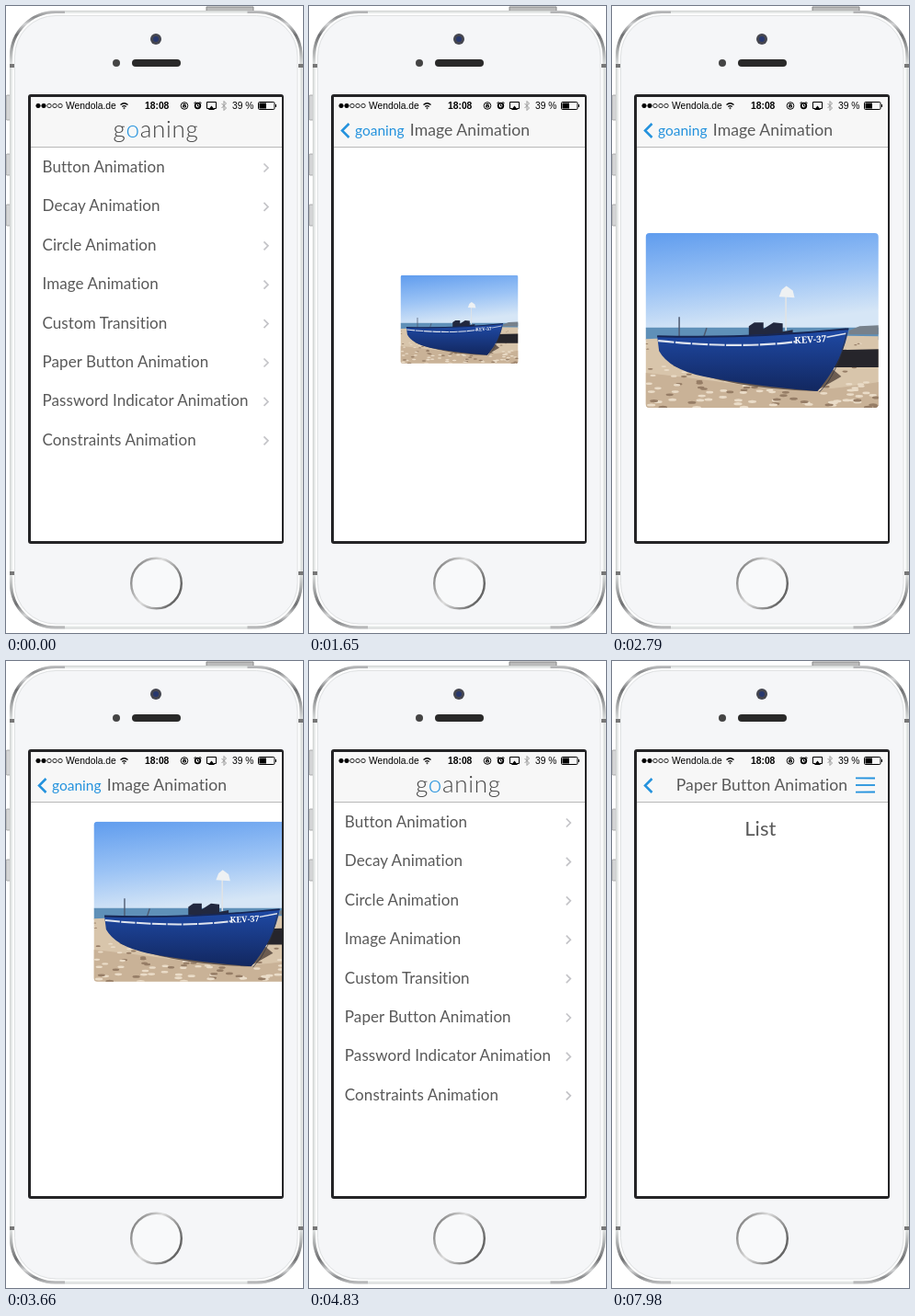
Write an HTML page that moves like this. It is 323 px wide and 682 px high and loops after 8000 ms.

```html
<!DOCTYPE html>
<html lang="en">
<head>
<meta charset="utf-8">
<title>Phone demo</title>
<style>
  html, body { margin: 0; width: 100%; height: 100%; overflow: hidden; background: #fff; }
  svg { display: block; width: 323px; height: 682px; }
  text { font-family: Lato, sans-serif; fill: #595959; font-variant-ligatures: none; }
  .status text { font: 10.3px "Liberation Sans", Arial, sans-serif; fill: #000; }
  .status .clock { font-weight: bold; }
  .row { font-size: 17px; letter-spacing: .08px; }
  .title { font-size: 17.6px; text-anchor: middle; letter-spacing: .05px; }
  .big { font-size: 22px; text-anchor: middle; }
  .line { fill: none; stroke: #2492dd; }
</style>
</head>
<body>
<svg viewBox="0 0 323 682">
  <defs>
    <linearGradient id="corner" gradientUnits="userSpaceOnUse" x1="0" y1="5" x2="0" y2="64">
      <stop offset="0" stop-color="#c4c5c6"/>
      <stop offset=".12" stop-color="#8a8b8d"/>
      <stop offset=".25" stop-color="#d2d3d4"/>
      <stop offset=".45" stop-color="#6f7072"/>
      <stop offset="1" stop-color="#dfe2e1"/>
    </linearGradient>
    <linearGradient id="ring" x2="1" y2=".5">
      <stop offset="0" stop-color="#666"/>
      <stop offset=".5" stop-color="#dedede"/>
      <stop offset="1" stop-color="#666"/>
    </linearGradient>
    <linearGradient id="sky" x2=".25" y2="1">
      <stop offset="0" stop-color="#5f9cee"/>
      <stop offset=".55" stop-color="#9bc3f5"/>
      <stop offset="1" stop-color="#d6e6f6"/>
    </linearGradient>
    <linearGradient id="hull" x2="0" y2="1">
      <stop offset="0" stop-color="#1f4aa6"/>
      <stop offset="1" stop-color="#12275f"/>
    </linearGradient>
    <clipPath id="screen"><path d="M27 99H300V582H27Z"/></clipPath>
    <clipPath id="photoEdge"><rect x="36.5" y="245.3" width="254" height="190.700" rx="4"/></clipPath>
    <path id="cornerArc" d="M5.500 63V55A48.500 48.500 0 0 1 54 6.500H64" fill="none" stroke="url(#corner)" stroke-width="3.200"/>
  </defs>

  <!-- phone body -->
  <path d="M218 5V1H269V5" fill="#bbb" stroke="#888"/>
  <g fill="#d4d5d6" stroke="#999" stroke-width=".8">
    <rect x="0" y="97" width="5" height="27" rx="1.5"/>
    <rect x="0" y="161" width="5" height="23" rx="1.5"/>
    <rect x="0" y="216" width="5" height="23" rx="1.5"/>
  </g>
  <rect x="4.500" y="5.500" width="317.500" height="671.500" rx="49.500" fill="#e6e9e8" stroke="#cfd2d1"/>
  <rect x="8" y="9" width="310.500" height="664.500" rx="46" fill="#f5f6f8" stroke="#fff" stroke-width="2"/>
  <rect x="9.500" y="10.500" width="307.500" height="661.500" rx="44.500" fill="#f5f6f8" stroke="#e0e2e3"/>
  <use href="#cornerArc"/>
  <use href="#cornerArc" transform="translate(326.500 0) scale(-1 1)"/>
  <use href="#cornerArc" transform="translate(0 682.500) scale(1 -1)"/>
  <use href="#cornerArc" transform="translate(326.500 682.500) scale(-1 -1)"/>
  <path d="M4 65H9M4 617H9M318 65H323M318 617H323" stroke="#777" stroke-width="4"/>
  <circle cx="163" cy="36" r="6" fill="#45464f"/>
  <circle cx="163" cy="36" r="3" fill="#28386e"/>
  <circle cx="120" cy="62" r="4" fill="#444"/>
  <rect x="137" y="58" width="53" height="8" rx="4" fill="#292929"/>
  <circle cx="163.500" cy="628" r="27.300" fill="#f8f9fa" stroke="url(#ring)" stroke-width="2.400"/>
  <rect x="25.500" y="97.500" width="275" height="486" rx="1.500" fill="#fff" stroke="#242426" stroke-width="3"/>

  <g clip-path="url(#screen)">
    <g id="listView">
      <path d="M27 99H303V582H27Z" fill="#fff"/>
      <g id="rows"></g>
    </g>
    <path id="dim" d="M27 99H300V582H27Z"/>

    <g id="imageView">
      <path d="M27 99H303V582H27Z" fill="#fff"/>
      <g id="photo"><g transform="translate(-163.5 -341)" clip-path="url(#photoEdge)">
        <path d="M36 245H291V350H36Z" fill="url(#sky)"/>
        <path d="M36 348.500H291V362H36Z" fill="#5f90b8"/>
        <path d="M258 352L270 347 291 346V356H258Z" fill="#77818b"/>
        <path d="M36 361Q160 356 291 358V436H36Z" fill="#d8c5ab"/>
        <path d="M36 398Q110 406 160 414T291 408V436H36Z" fill="#c9b297"/>
        <g id="sand"></g>
        <path d="M242 373L291 372V392L236 392Z" fill="#26252b"/>
        <path d="M66 390Q130 416 222 418L250 402 238 392Z" fill="#6c5c50"/>
        <path d="M73 360V337M100 358L103 349" fill="none" stroke="#4d5a70" stroke-width="1.500"/>
        <path d="M189.500 352V312" fill="none" stroke="#dfe3e6" stroke-width="1.800"/>
        <path d="M182 315L185 307 190 303 197 308 199 316Z" fill="#eef1f3"/>
        <path d="M149 357V347L155 343H165V350L176 343 186 344V353L197 351V357Z" fill="#22283f"/>
        <path d="M49 358Q150 360 258 350Q252 385 224 418Q150 412 100 402Q62 394 51 374Z" fill="url(#hull)"/>
        <path d="M50 363Q140 372 200 364" fill="none" stroke="#dfe4ee" stroke-width="2.200" stroke-dasharray="17 1.500"/>
        <path d="M234 359L255 355" stroke="#dfe4ee" stroke-width="1.500"/>
        <path d="M49 358Q150 361 258 350" fill="none" stroke="#172653" stroke-width="2"/>
        <path d="M256 354Q246 400 226 419" fill="none" stroke="#30333e" stroke-width=".8"/>
        <text x="199" y="366" transform="rotate(-3 199 366)" style="font:bold 10px 'Noto Serif',serif;fill:#fff">KEV-37</text>
      </g></g>
    </g>

    <g id="paperView">
      <path d="M27 99H303V582H27Z" fill="#fff"/>
      <text id="label" class="big" y="190">List</text>
    </g>

    <!-- navigation bar -->
    <path d="M27 99H300V154H27Z" fill="#f7f7f7"/>
    <path d="M27 153.500H300" stroke="#b8b8b8"/>
    <text id="logo" x="163" y="143" text-anchor="middle" font-size="26" font-weight="300" letter-spacing=".7" style="fill:#444">g<tspan fill="#2492dd" style="fill:#2492dd">o</tspan>aning</text>
    <path id="chevron" class="line" d="M43.500 128L36 135.500 43.500 143" stroke-width="2.500"/>
    <text id="backLabel" x="50" y="141" font-size="15.500" style="fill:#2492dd">goaning</text>
    <text id="imageTitle" class="title" x="175" y="141">Image Animation</text>
    <text id="paperTitle" class="title" x="163" y="141">Paper Button Animation</text>
    <g id="menu" class="line" stroke-width="1.800">
      <path id="top" d="M-10.500 0H10.500"/>
      <path id="middle" d="M-10.500 0H10.500" transform="translate(275.500 135)"/>
      <path id="bottom" d="M-10.500 0H10.500"/>
    </g>

    <g class="status">
      <g id="signal" stroke="#000" stroke-width=".8"></g>
      <text x="65" y="112">Wendola.de</text>
      <g fill="none" stroke="#000" stroke-width="1.300">
        <path d="M124.500 107.500Q128.500 104 132.500 107.500M126.300 109.600Q128.500 107.600 130.700 109.600"/>
        <circle cx="128.500" cy="111.300" r=".3"/>
      </g>
      <text class="clock" x="151" y="112">18:08</text>
      <g fill="none" stroke="#000">
        <circle cx="194" cy="108.500" r="3.800"/>
        <path d="M192.500 108.500H195.500V110H192.500ZM193 108V106.500H195V108"/>
        <circle cx="208.500" cy="108.500" r="2.800" stroke-width="1.800"/>
        <path d="M204.500 106L206.500 104M212.500 106L210.500 104M208.500 107V109H210"/>
        <path d="M221 111.500H218.500V104.500H228.500V111.500H226"/>
        <path d="M220 113L223.500 108.500 227 113Z" fill="#000" stroke="none"/>
        <path d="M234.500 106L239.500 111 237 113.500V103.500L239.500 106 234.500 111" stroke="#999"/>
        <rect x="274.500" y="104.500" width="17.500" height="8" rx="1.200"/>
        <path d="M275.500 105.500H283V111.500H275.500ZM293 107H294V110H293Z" fill="#000" stroke="none"/>
      </g>
      <text x="246" y="112">39 %</text>
    </g>
  </g>
</svg>

<script>
const LOOP = 8000, CENTER_X = 163.5, CENTER_Y = 341, WIDTH = 276;
const $ = id => document.getElementById(id);

$('rows').innerHTML = ['Button', 'Decay', 'Circle', 'Image', 'Custom', 'Paper Button', 'Password Indicator', 'Constraints']
  .map((name, i) => {
    const y = 181 + 42.4 * i;
    const kind = name === 'Custom' ? 'Transition' : 'Animation';
    return `<text class="row" x="39.500" y="${y}">${name} ${kind}</text>
      <path d="M280.500 ${y - 9.5}l4.500 4.500-4.500 4.500" fill="none" stroke="#c4c4c8" stroke-width="1.700"/>`;
  }).join('');
$('signal').innerHTML = [0, 1, 2, 3, 4]
  .map(i => `<circle cx="${35 + 6 * i}" cy="108.500" r="2.200" fill="${i < 2 ? '#000' : 'none'}"/>`).join('');

// Footprints in the sand, larger towards the viewer.
let seed = 7;
const random = () => (seed = seed * 16807 % 2147483647) / 2147483647;
$('sand').innerHTML = Array.from({ length: 170 }, (_, i) => {
  const depth = random(), size = 1 + 2 * depth;
  return `<ellipse cx="${36 + 255 * random()}" cy="${366 + 70 * depth}" rx="${size * 1.6}" ry="${size * 0.55}"
    fill="${i % 2 ? '#967d66' : '#eadcc8'}"/>`;
}).join('');

// Damped spring from 0 to 1; ms is the time since its start.
function spring(ms, damping, frequency) {
  if (ms <= 0) return 0;
  const s = ms / 1000, a = frequency * s;
  return 1 - Math.exp(-damping * s) * (Math.cos(a) + damping / frequency * Math.sin(a));
}
const scaleSpring = ms => spring(ms, 11, 14.9);
const moveSpring = ms => spring(ms, 9.75, 15.7);
const turnSpring = ms => spring(ms, 6.7, 30.9);
const crossSpring = ms => spring(ms, 6.7, 21.6);

// Critically damped screen transition.
function slide(ms) {
  const a = Math.max(0, ms) * 0.015;
  return 1 - (1 + a) * Math.exp(-a);
}

// Offset of a finger drag through [time, x, y] points, springing home on release.
function drag(t, points, release) {
  if (t <= points[0][0]) return [0, 0];
  const home = 1 - moveSpring(t - release);
  const next = points.findIndex(p => p[0] > t);
  if (next < 0) return points.at(-1).slice(1).map(v => v * home);
  const a = points[next - 1], b = points[next];
  const u = (t - a[0]) / (b[0] - a[0]), k = u * u * (3 - 2 * u);
  return [1, 2].map(i => a[i] + (b[i] - a[i]) * k);
}

function move(id, x, y = 0, rest = '') {
  $(id).setAttribute('transform', `translate(${x} ${y}) ${rest}`);
}
function fade(id, value) {
  $(id).setAttribute('opacity', Math.min(1, Math.max(0, value)));
}

function drawScreens(t) {
  const image = slide(t - 710) - slide(t - 4370);
  const paper = slide(t - 5330);
  const away = Math.max(image, paper);
  const late = progress => progress * 1.15 - 0.1;
  move('listView', -0.3 * WIDTH * away);
  fade('dim', 0.08 * away);
  move('imageView', WIDTH * (1 - image));
  move('paperView', WIDTH * (1 - paper));
  move('logo', -86 * away);
  fade('logo', 1 - 1.5 * away);
  fade('chevron', late(away));
  move('backLabel', 86 * (1 - image));
  fade('backLabel', late(image));
  move('imageTitle', 130 * (1 - image));
  fade('imageTitle', late(image));
  move('paperTitle', 130 * (1 - paper));
  fade('paperTitle', late(paper));
  fade('menu', late(paper));
}

function drawPhoto(t) {
  const first = drag(t, [[1670, 0, 0], [2050, -36, 128], [2310, -22, 104]], 2330);
  const second = drag(t, [[3590, 0, 0], [3660, 48, -79], [3760, 62, -100], [3930, 56, -92]], 4010);
  const shrink = scaleSpring(t - 1270) - scaleSpring(t - 2330) + scaleSpring(t - 3624) - scaleSpring(t - 4010);
  move('photo', CENTER_X + first[0] + second[0], CENTER_Y + first[1] + second[1], `scale(${1 - shrink / 2})`);
}

function drawMenu(t) {
  const open = 6165, close = 7305;
  const turn = 45 * (turnSpring(t - open) - turnSpring(t - close));
  const gap = 7.5 * (1 - crossSpring(t - open) + crossSpring(t - close));
  move('top', 275.5, 135 - gap, `rotate(${-turn})`);
  move('bottom', 275.5, 135 + gap, `rotate(${turn})`);
  const faded = ms => 1 - (1 - Math.min(1, Math.max(0, ms / 300))) ** 2;
  fade('middle', 1 - faded(t - open) + faded(t - close));
}

function drawLabel(t) {
  const out = 200, start = t < 7300 ? 6160 : 7300, ms = t - start;
  let offset = 0;
  if (ms > 0) offset = ms < out ? (ms / out) ** 1.65 : 1 - scaleSpring(ms - out);
  $('label').textContent = t >= 6360 && t < 7500 ? 'Menu' : 'List';
  $('label').setAttribute('x', 163 - WIDTH * offset);
}

function frame(now) {
  const t = now % LOOP;
  drawScreens(t);
  drawPhoto(t);
  drawMenu(t);
  drawLabel(t);
  requestAnimationFrame(frame);
}
frame(0);
</script>
</body>
</html>
```
